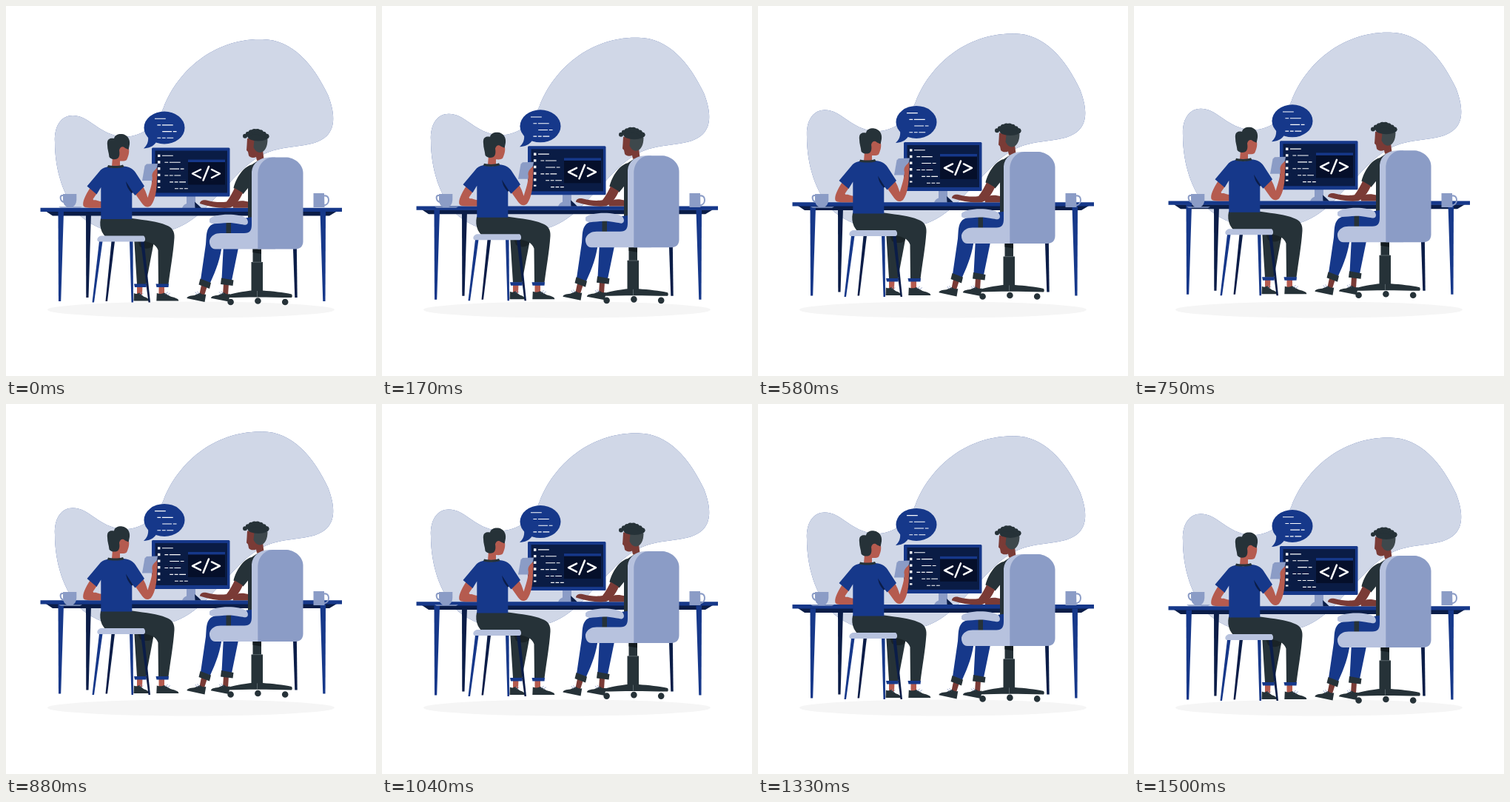
Write an HTML page that moves like this. It is 500 by 500 pixels and loops after 1540 ms.

```html
<!DOCTYPE html>
<html lang="en">
<head>
<meta charset="utf-8">
<title>Pair at a desk</title>
<style>
html, body { margin: 0; width: 100%; height: 100%; overflow: hidden; background: #fff; }
svg { display: block; width: 100%; height: 100%; }
.blue { fill: #16388a; }
.navy { fill: #0b1d48; }
.dark { fill: #263238; }
.mist { fill: #b7c2de; }
.slate { fill: #8b9cc6; }
.rose { fill: #b55b4f; }
.brown { fill: #7a3b36; }
.line { fill: none; stroke: #fff; stroke-width: 1.1; }
.lace { fill: none; stroke: #8b9cc6; stroke-width: .8; }
</style>
</head>
<body>
<svg viewBox="0 0 500 500">
  <defs>
    <path id="cloud" d="M66 184C65 160 76 148 90 148C112 148 122 170 152 176C180 180 202 164 213 137C232 88 280 45 343 45C385 43 415 78 435 120C444 143 446 164 433 176C416 192 383 187 356 197C325 208 305 238 281 261C262 282 240 303 205 306C160 312 125 306 100 283C78 260 66 222 66 184Z"/>
    <g id="shoe">
      <path class="dark" d="M.5 -10.5C5 -9 8 -9.5 10.5 -11L19 -6C26 -4 30 -3 30 0H0Z"/>
      <path class="lace" d="M11.5 -9l4 -3M14.5 -7.5l4 -3"/>
    </g>
  </defs>
  <ellipse cx="250" cy="410.5" rx="194" ry="11" fill="#f5f5f5"/>

  <g class="float">
    <use href="#cloud" class="blue"/>
    <use href="#cloud" fill="#fff" opacity=".8"/>

    <path class="blue" d="M192 176C193 184 190 189 186 192.5C193 192 199 190 203 184Z"/>
    <ellipse class="blue" cx="214" cy="164.5" rx="27.5" ry="22"/>
    <path id="speech" class="line"/>

    <g id="monitor">
      <path class="slate" d="M244 256H256V267C260 268 262 270 263 273H238C239 270 241 268 244 267Z"/>
      <path class="navy" d="M255 264.5L264 273H255.5Z"/>
      <rect class="blue" x="197" y="191.5" width="105.5" height="66" rx="1.5"/>
      <rect x="201.5" y="195.5" width="97.5" height="57" fill="#0a1c45"/>
      <rect x="246" y="207.5" width="50" height="34" fill="#050f2a"/>
      <rect class="blue" x="246" y="207.5" width="50" height="3.5"/>
      <path d="M263 221L252 226.5L263 232M274 217L266.5 235.5M278 221L289 226.5L278 232" fill="none" stroke="#fff" stroke-width="2.5" stroke-linecap="round" stroke-linejoin="round"/>
      <path id="bullets" d="M206.7 200.7V246" fill="none" stroke="#fff" stroke-width="3.4" stroke-dasharray="3.4 5.25"/>
      <path id="code" class="line"/>
    </g>

    <g id="table">
      <path class="navy" d="M54 277.5H447L437 283.5H63Z"/>
      <path class="blue" d="M46.5 272.7H454V278H46.5Z"/>
    </g>
  </g>

  <g id="cups">
    <path class="slate" d="M77 254H95.3V262C95 267 93 270 90.5 271.3H82C79 270 77.2 267 77 262ZM71 271.2H103L100 272.7H74Z"/>
    <path class="slate" d="M415.5 253H430L430.5 272H415.5Z"/>
    <path d="M78 256H75.5C72.5 257 73 264 78.5 265M430 256.5C438 255 438 268 430 269.5" fill="none" stroke="#8b9cc6" stroke-width="2"/>
  </g>

  <g class="float">
    <g id="left-person">
      <path class="slate" d="M190 213.5L205 213L201 236H184L187.5 216Z"/>
      <path class="rose" d="M177 378H184.5L184 390H177ZM206.5 378H214V390H206.5Z"/>
      <use href="#shoe" transform="translate(172.5 398.5) scale(.7 1)"/>
      <use href="#shoe" transform="translate(203.3 398.5)"/>
      <path class="dark" d="M173 312L177 376H189L200 318Z"/>
      <path d="M178 317H200L198 325C193 329 185 328 181 325Z" fill="#1a2327"/>
      <path class="dark" d="M128 287H170.5C190 290 205 291 216 296C225 299 228 305 227.5 313C226 335 222 355 219.5 376H206L205.5 330C203 322 195 319 187 318H142C131 311 125 301 128 287Z"/>
      <path class="blue" d="M173 375.5H190L189.5 380H174ZM202.5 375.5H220L219.5 380H203.5Z"/>

      <path class="rose" d="M113.5 246C107 256 103 265 104.5 270C106 273.2 112 272.7 131 272.7V264.5C125 264.5 122 261.5 118.5 262.5L117.5 261L123 253Z"/>
      <path class="rose" d="M174 253L185 244C189 250 190.5 256 191.5 259C195 248 197.5 240 197.8 232C196.5 226 199 224 204 218.5C205 222 204.5 227 204 233C204 247 202 262 196 269.5C191 273.5 187 271 184 267Z"/>
      <path class="rose" d="M152 189C158 186 166 188 166 193C167 198 165 204 163 208C161 210 157 209.5 154 209.5V217H143L144 204Z"/>
      <path class="blue" d="M128 221.5C131 218.5 135 218 138 217C144 219.5 153 219 158 216.5C166 217 172 220 175 225L187 243.5L174.5 256L170.3 251V288H128.3V245L122.5 254.5L109.5 243.5Z"/>
      <path d="M138 215C144 216.5 152 216.5 158 214.5L159.5 217.5C153 219.5 143 219.5 137 218Z" fill="#263238"/>
      <path class="navy" d="M162 237L171.5 252L170 253C165 248 163 243 162 237Z"/>
      <path class="dark" d="M137 188C136 180 140 178 146 179C147 174 152 172.5 157 173C164 174 168 180 167 187C166.5 190 166 192 165.5 194L161 192C158 189 154 190 153 195C154 201 153 205 150 206.5C146 208 141 207 139.5 204C139 198 137 194 137 188Z"/>
    </g>

    <g id="stool">
      <path class="mist" d="M128 310.5H186C189 313 188.5 318 186 318.5H125C122 317 123 312 128 310.5Z"/>
    </g>

    <g id="right-person">
      <path class="brown" d="M264 377L271.5 380L268 391L261.5 389ZM294 375H301L300 391H293Z"/>
      <use href="#shoe" transform="translate(268.5 400) rotate(12) scale(-.82 1)"/>
      <use href="#shoe" transform="translate(301 399.5) rotate(11) scale(-.82 1)"/>
      <path class="brown" d="M306 269C311 263 318 262 329 265V272.7H307Z"/>
      <path class="dark" d="M345 206L332 214.5C321 217 311 232 307.5 246L320.5 254L327 246V290H345Z"/>
      <path class="brown" d="M309 246L320 252.5C316 262 310 270 303 272.5C290 274 275 271 267 268.5L262 267C262 263.5 266 261.5 271 262.5C282 265.5 292 265.5 298 264.5C303 258 306 252 309 246Z"/>
      <path class="blue" d="M334 285C305 289 285 290 276 297C270 303 271 312 270 322L263 370L276 374C284 357 290 340 292 322L334 312ZM294 322L291.5 369L305 371L315 322Z"/>
      <path class="dark" d="M262.5 368.5L277 374L275 382L260.5 376.5ZM291 367.5L307.5 370.5L306.5 378L290 376Z"/>
      <path class="brown" d="M326 179H338L340 196L347 195L348.5 207L339 209L338 204C334 206 329 204.5 328 202L327 197L325 195L325.5 188Z"/>
      <path d="M335.5 181L353.5 180C353.5 190 350 197.5 343 198C338.5 198 336 194 334.5 191Z" fill="#3e484c"/>
      <ellipse class="dark" cx="341" cy="176.5" rx="14.5" ry="6"/>
      <g id="curls" class="dark"/>
    </g>

    <g id="chair">
      <path class="dark" d="M297.5 290H304V309H297.5Z"/>
      <path class="mist" d="M275 288C280 280.5 315 279.5 325 287C328 291 327.5 295 324 295.8C320 296 312 293 300 293C288 293 278 296.5 275 292Z"/>
      <path class="dark" d="M333.5 327H345V346H333.5ZM331.5 346H347V386H331.5Z"/>
      <path d="M333.5 328H345V335L333.5 333Z" fill="#141c20"/>
      <path class="dark" d="M298.5 391C315 386 325 385.5 331.5 384.5H347C360 385.5 375 387 386 389.5C387 391 387 393 386 394C370 394 355 393.4 340 393.4C325 393.4 312 394 298.5 394Z"/>
      <path d="M333 346.2H346M339.5 385V393" fill="none" stroke="#7b868b" stroke-width=".6"/>
      <path class="dark" id="wheels"/>
      <path class="mist" d="M332 295V224C333 212 343 205 355 204.5H364V328.5H283C277 328.5 274.5 322 275 317C277 310 283 307 290 307H322C330 307 332 303 332 295Z"/>
      <path class="slate" d="M340.3 328.5V227C340.5 215 349 205 360 204.5H380C392 206 401.5 215 401.5 226V318C401.5 325 397 328.5 391 328.5Z"/>
    </g>
  </g>
</svg>
<script>
const $ = id => document.getElementById(id);
const floats = document.querySelectorAll('.float');

// Each letter is a word, each leading space one indent
const SCRIPT = ['d', ' ad', '   ca', ' aab', '   aab', '     aaa'];
const WORD = { a: 4.8, b: 8.8, c: 12.8, d: 14.8 };

function writeCode(id, left, top, step, count) {
  let d = '';
  SCRIPT.slice(0, count).forEach((row, i) => {
    let x = left;
    for (const c of row) {
      if (c === ' ') { x += 3.4; continue; }
      d += `M${x} ${top + i * step}h${WORD[c]}`;
      x += WORD[c] + 1.7;
    }
  });
  $(id).setAttribute('d', d);
}

const disc = (x, y, r) =>
  `M${x - r} ${y}a${r} ${r} 0 1 0 ${2 * r} 0a${r} ${r} 0 1 0 ${-2 * r} 0`;

// Tapered leg from (x, top) to (foot, bottom), drawn first or last in its group
function addLeg(group, colour, x, top, foot, bottom, wide, slim, where = 'beforeend') {
  $(group).insertAdjacentHTML(where,
    `<path class="${colour}" d="M${x} ${top}h${wide}L${foot + slim} ${bottom}H${foot}Z"/>`);
}

writeCode('speech', 201, 152.2, 8.7, 4);
writeCode('code', 211, 202.3, 8.9, 6);

addLeg('table', 'navy', 108, 280, 108.3, 394, 7, 3.2, 'afterbegin');
addLeg('table', 'navy', 386.3, 280, 390.3, 394, 6, 3.4, 'afterbegin');
addLeg('table', 'blue', 70.5, 278, 71, 399, 7.5, 3.2);
addLeg('table', 'blue', 424.5, 278, 428.3, 399, 7.5, 3.2);

addLeg('stool', 'navy', 142.5, 318, 134.5, 399, 4.5, 2.5, 'afterbegin');
addLeg('stool', 'navy', 182, 318, 192.5, 400.5, 4.5, 2.5, 'afterbegin');
addLeg('stool', 'blue', 126, 318, 116.5, 400.5, 4.5, 2.5, 'afterbegin');
addLeg('stool', 'blue', 167, 318, 169.5, 400.5, 4.5, 2.5, 'afterbegin');

$('wheels').setAttribute('d', [-1, 0, 1].map(i =>
  disc(340.4 + 36.8 * i, 398.5 + 1.5 * Math.abs(i), 4.3)).join(''));

// Curls follow an arch over the head
for (let i = 0; i < 8; i++) {
  const lift = Math.sin(Math.PI * i / 7);
  $('curls').insertAdjacentHTML('beforeend',
    `<path d="${disc(323 + 4.2 * i, 175.8 - 6 * lift, 3 + lift)}"/>`);
}

const LOOP = 1540, STEPS = 37, RISE = 10;

// Linear rise and fall, held at 24 steps a second
function draw(time) {
  const step = Math.min(STEPS - 1, Math.floor((time % LOOP + 5) * 24 / 1000));
  const u = (step + 1) / STEPS;
  const y = 0.54 - RISE * (1 - Math.abs(1 - 2 * u));
  for (const g of floats) g.setAttribute('transform', `translate(0 ${y.toFixed(3)})`);
}

const start = performance.now();
function tick() {
  draw(performance.now() - start);
  requestAnimationFrame(tick);
}
draw(0);
requestAnimationFrame(tick);
</script>
</body>
</html>
```
